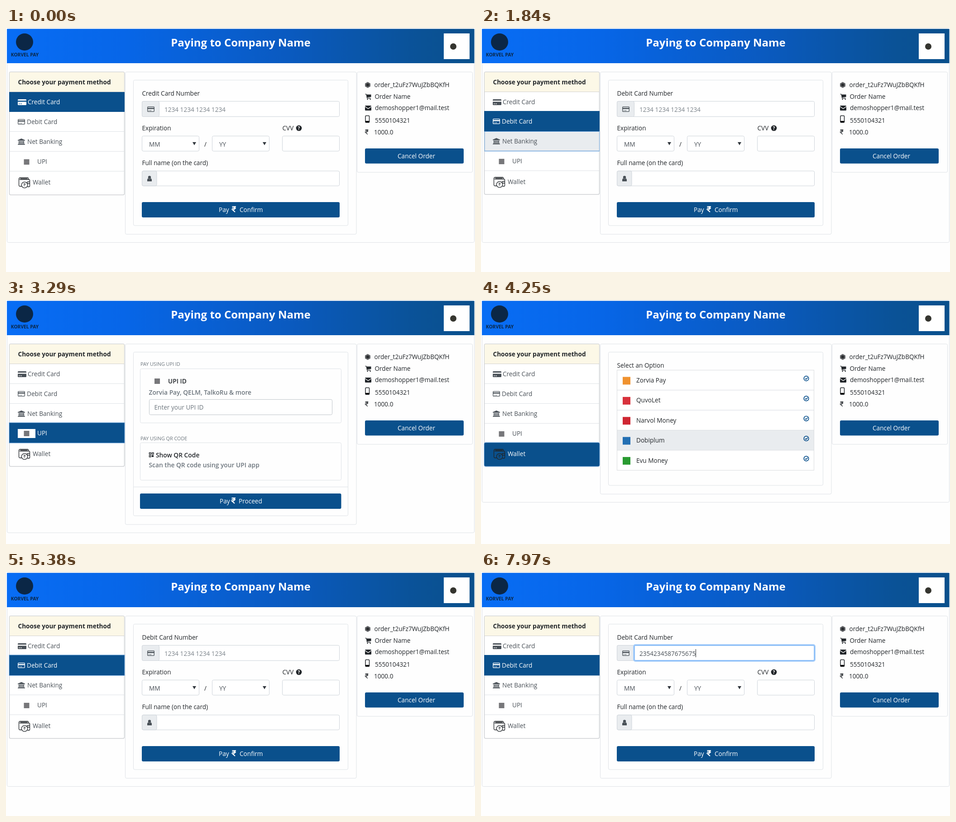
These frames come from a looping animation (1036x541 px, 8000 ms). An HTML page:

```html
<!DOCTYPE html>
<html lang="en">
<head>
<meta charset="utf-8">
<title>Payment page</title>
<style>
  html, body { margin: 0; width: 100%; height: 100%; overflow: hidden; background: #fefefe; }
  svg { display: block; width: 1036px; height: 541px; }
  text { font: 13.6px "Open Sans", "Noto Sans", sans-serif; fill: #212529; white-space: pre; }
  .title { font-size: 24px; font-weight: 700; }
  .bold { font-weight: 700; }
  .semi { font-size: 13.8px; font-weight: 600; }
  .small { font-size: 10.8px; }
  .brand { font-size: 10.3px; font-weight: 700; }
</style>
</head>
<body>
<svg id="stage" viewBox="0 0 1036 541">
  <defs>
    <linearGradient id="sky">
      <stop offset="0" stop-color="#086df5"/>
      <stop offset=".25" stop-color="#0766e8"/>
      <stop offset=".6" stop-color="#0a5ac0"/>
      <stop offset=".88" stop-color="#0a5297"/>
      <stop offset="1" stop-color="#0a508c"/>
    </linearGradient>
    <g id="credit">
      <path fill="currentColor" fill-rule="evenodd" d="M1.5 0h16a1.5 1.5 0 0 1 1.5 1.5V3H0V1.500A1.5 1.500 0 0 1 1.5 0ZM0 5.500H19V11.500A1.500 1.500 0 0 1 17.500 13H1.500A1.500 1.500 0 0 1 0 11.500ZM2 9.500V10.800H5V9.500ZM6 9.500V10.800H9V9.500Z"/>
    </g>
    <g id="card">
      <rect x=".7" y=".7" width="14.600" height="10.600" rx="1.300" fill="none" stroke="currentColor" stroke-width="1.300"/>
      <path fill="currentColor" d="M1 3H15V5.500H1ZM3 8.500H5V9.600H3ZM6 8.500H9V9.600H6Z"/>
    </g>
    <path id="bank" fill="currentColor" d="M8 0L16 3.500V4.700H0V3.500ZM2 5.500H4.200V10.800H2ZM5.300 5.500H7.400V10.800H5.300ZM8.600 5.500H10.700V10.800H8.600ZM11.800 5.500H14V10.800H11.800ZM1 11.200H15V12.400H1ZM0 12.800H16V14H0Z"/>
    <path id="rupee" fill="none" stroke="currentColor" d="M.5 1H9M.5 4.300H9M.5 1H3Q6.500 1 6.500 4.300T3 7.500H1L7 13"/>
    <g id="wallet" fill="none" stroke="currentColor" stroke-width="1.300">
      <path d="M7 20H3Q1 20 1 17V4Q1 1 4 1H20Q22 1 22 3V5M2 4.500Q3 5 5 5H23Q25 5 25 7V19Q25 21 23 21H20M25 10H21Q19 10 19 12T21 14H25M4 3H20"/>
      <circle cx="13.500" cy="17" r="6.700"/>
      <use href="#rupee" transform="translate(11 13.500) scale(.55)"/>
    </g>
    <g id="tick" fill="none" stroke="#0a508c" stroke-width="1.700">
      <circle r="5.300"/><path d="M-2.600 0L-.6 2L3 -1.800"/>
    </g>
    <path id="cart" fill="currentColor" d="M0 0H2.700L3.200 1.500H13V7L4.600 8L4.800 9H12V10.200H3.700L2 1.200H0ZM4 11H6.300V13H4ZM10 11H12.300V13H10Z"/>
  </defs>
  <g id="view"></g>
</svg>
<script>
const NAVY = '#0a508c', INK = '#212529', GREY = '#495057', LINE = '#dee2e6', EDGE = '#ced4da', SHADE = '#e9ecef';
const LOOP = 8000, NUMBER = '2354234587675675', TYPE_START = 6150, TYPE_STEP = 105;

// Pointer and page state: each entry overrides the earlier ones.
const timeline = [
  [0, { page: 0, focus: -1, hover: -1, row: -1, editing: false }],
  [700, { hover: 1 }],
  [1000, { page: 1, focus: 1 }],
  [1500, { hover: 2 }],
  [1800, { focus: 2 }],
  [1900, { page: 2 }],
  [2450, { hover: 3 }],
  [2750, { page: 3, focus: 3 }],
  [3400, { hover: 4 }],
  [3600, { page: 4, focus: 4, hover: -1 }],
  [3950, { row: 4 }],
  [4100, { row: 3 }],
  [4600, { row: -1 }],
  [4800, { hover: 1 }],
  [5050, { page: 1, focus: 1, hover: -1 }],
  [5950, { focus: -1, editing: true }]
];

const text = (x, y, str, fill = INK, cls = '', more = '') =>
  `<text x="${x}" y="${y}" class="${cls}" style="fill:${fill}" ${more}>${str}</text>`;
const centred = (x, y, str, fill, cls) => text(x, y, str, fill, cls, 'text-anchor="middle"');
const box = (x, y, right, bottom, stroke = LINE, fill = 'none', r = 3, w = 1) =>
  `<rect x="${x}" y="${y}" width="${right - x}" height="${bottom - y}" rx="${r}" fill="${fill}" stroke="${stroke}" stroke-width="${w}"/>`;
const icon = (id, x, y, color = GREY, more = '') =>
  `<use href="#${id}" transform="translate(${x} ${y})" color="${color}" ${more}/>`;
const hline = (x, right, y, color = LINE) => `<path d="M${x} ${y}H${right}" stroke="${color}"/>`;
const square = (x, y, size, fill) => box(x, y, x + size, y + size, 'none', fill, 0);
const button = (x, y, right, bottom) => box(x, y, right, bottom, 'none', NAVY);

function header() {
  return `<rect x="2" y="2" width="1032.500" height="76" fill="url(#sky)"/>
    <circle cx="41" cy="31" r="19" fill="#0b2746"/>` +
    centred(41.5, 63, 'KORVEL PAY', '#0b2746', 'brand') +
    centred(518.5, 41, 'Paying to Company Name', '#fff', 'title') +
    box(967, 12, 1024, 69, 'none', '#fff', 0) +
    '<circle cx="988" cy="41" r="7" fill="#35352f"/>';
}

const menu = [
  { label: 'Credit Card', x: 48, y: 169, top: 142, end: 186, mark: (y, c) => icon('credit', 26, y - 11, c) },
  { label: 'Debit Card', x: 46, y: 213, top: 186, end: 230.5, mark: (y, c) => icon('card', 26, y - 11, c) },
  { label: 'Net Banking', x: 47, y: 257, top: 230.5, end: 274, mark: (y, c) => icon('bank', 26, y - 12, c) },
  { label: 'UPI', x: 69, y: 301, top: 274, end: 318, mark: (y, c) =>
    (c === '#fff' ? box(26, y - 14, 65, y + 6, 'none', '#fff', 0) : '') + square(39.5, y - 10, 12, '#77777a') },
  { label: 'Wallet', x: 59, y: 347, top: 318, end: 370, mark: y => icon('wallet', 27.5, y - 16, INK) }
];

function sidebar({ page, hover, focus }) {
  const shift = i => page > 0 && i >= page ? 1 : 0;
  const bottom = 370 - shift(4);
  let out = box(7.5, 97.5, 261.5, bottom, '#cfd1d4', '#fff', 3, 1.5) +
    box(8, 98, 261, 141.5, 'none', '#fcf8e7', 2) + hline(8, 261, 141.5, '#d3d3cf') +
    text(26.5, 125, 'Choose your payment method', INK, 'bold');
  menu.forEach((item, i) => {
    const active = i === page, s = shift(i), y = item.y - s;
    const top = item.top - s - (active && i ? 1 : 0), end = item.end - s;
    const ring = i === focus ? '#6fa5dc' : 'none';
    if (active) out += box(7, top, 262, end, ring, NAVY, i === 4 ? 3 : 0);
    else {
      if (i === hover) out += box(8, top, 261.5, end, ring, SHADE, 0);
      if (i < 4) out += hline(8, 261, Math.floor(end) - .5, i === hover ? '#6fa5dc' : LINE);
    }
    out += item.mark(y, active ? '#fff' : GREY) + text(item.x, y, item.label, active ? '#fff' : GREY);
  });
  return out;
}

function orderCard() {
  const hex = '<path d="M799 119.500L805 123V129.500L799 133L793 129.500V123Z" fill="#65676a"/><circle cx="799" cy="126.300" r="3.300" fill="#292b2e"/>';
  const mail = '<rect x="793" y="172" width="14" height="11" rx="1.500" fill="#212529"/><path d="M793 174L800 179L807 174" fill="none" stroke="#fff" stroke-width="1.200"/>';
  const phone = '<rect x="794" y="194.500" width="8.500" height="15" rx="1.500" fill="none" stroke="#212529" stroke-width="1.500"/><path d="M794 206H802.500V209H794Z"/>';
  return box(775.5, 97.5, 1030.5, 320) + hex + icon('cart', 793.5, 146, INK) + mail + phone +
    icon('rupee', 793, 225, INK, 'stroke-width="1.700" transform-origin="0 0"').replace(')"', ') scale(.82)"') +
    text(813.5, 131, 'order_t2uFz7WuJZbBQKfH') + text(814.5, 157, 'Order Name') +
    text(815, 182, 'demoshopper1@mail.test') + text(815, 210, '5550104321') + text(813, 236, '1000.0') +
    button(793, 267, 1011, 300.5) + centred(906.5, 289, 'Cancel Order', '#fff');
}

function frame(bottom) {
  return box(2.5, 1.5, 1034.5, bottom) + box(263.5, 97.5, 774, bottom - 18.2) + box(281.5, 115.5, 755.5, bottom - 37.5);
}

function payButton(x, y, right, label, gap) {
  const payX = x + (gap ? 170 : 176);
  return button(x, y, right, y + 34) + text(payX, y + 22, 'Pay', '#fff') +
    icon('rupee', payX + (gap ? 29 : 26), y + 9, '#fff', 'stroke-width="2.200"') +
    text(payX + (gap ? 46 : 42), y + 22, label, '#fff');
}

function dropdown(x, right, label) {
  const a = right - 14.5;
  return box(x, 239.5, right, 273, EDGE, '#fff') + text(x + 15.5, 262.5, label, GREY) +
    `<path d="M${a} 253H${a + 8}L${a + 4} 260Z" fill="#343a40"/>`;
}

function cardForm(kind, editing, typed) {
  const value = NUMBER.slice(0, typed);
  return frame(475.5) + text(300.5, 150, kind + ' Card Number') +
    box(300.5, 162.5, 736.5, 196.5, EDGE, '#fff') + box(300.5, 162.5, 338.5, 196.5, EDGE, SHADE) + icon('card', 312, 174) +
    (editing ? box(338, 162, 737, 197, '#aacffa', '#fff', 3, 4) + box(338.5, 162.5, 736.5, 196.5, '#76b3f5') : '') +
    text(350, 185.5, value || '1234 1234 1234 1234', value ? GREY : '#7b838a', '', 'id="number"') +
    (editing ? '<path id="caret" d="M0 171V189" stroke="#212529"/>' : '') +
    text(300.5, 227, 'Expiration') + dropdown(300.5, 426.5, 'MM') + text(438, 262.5, '/') + dropdown(455.5, 581.5, 'YY') +
    text(610.5, 227, 'CVV') + '<circle cx="647" cy="222" r="6.300" fill="#212529"/>' + centred(647, 226, '?', '#fff', 'brand') +
    box(610.5, 239.5, 736.5, 273, EDGE, '#fff') +
    text(300.5, 304, 'Full name (on the card)') +
    box(300.5, 317, 736.5, 350, EDGE, '#fff') + box(300.5, 317, 333, 350, EDGE, SHADE) +
    `<circle cx="317" cy="331" r="3.200" fill="${GREY}"/><path d="M312 340V337Q312 333.500 314.500 333.500Q317 335.500 319.500 333.500Q322 333.500 322 337V340Z" fill="${GREY}"/>` +
    payButton(300, 386, 737, 'Confirm', true);
}

function bankPage() {
  return frame(475.5) + text(300.5, 150, 'Select an Option') + payButton(300, 386, 737, 'Confirm', true);
}

function upiPage() {
  const soft = '#6c757d';
  const finder = (x, y) => box(x, y, x + 3.5, y + 3.5, INK, 'none', 0, 1.4);
  return frame(516) + text(297, 146, 'PAY USING UPI ID', soft, 'small') + box(296.5, 152.5, 740.5, 272.5) +
    square(328, 174, 12, '#77777a') + text(358, 184.5, 'UPI ID', INK, 'semi') +
    text(315.5, 210, 'Zorvia Pay, QELM, TalkoRu &amp; more', soft, 'semi') +
    box(316.5, 220.5, 720.5, 254.5, '#bfc5ca', '#fff') + text(327.5, 243, 'Enter your UPI ID', soft) +
    text(297, 310.5, 'PAY USING QR CODE', soft, 'small') + box(296.5, 316.5, 740.5, 399.5) +
    finder(316.5, 338.5) + finder(322.5, 338.5) + finder(316.5, 344.5) + square(322, 344, 4, INK) +
    text(331, 348.5, 'Show QR Code', INK, 'semi') + text(315.5, 371, 'Scan the QR code using your UPI app', soft, 'semi') +
    hline(282, 755, 414.5) + payButton(296, 429, 740.5, 'Proceed', false);
}

function walletPage(hovered) {
  const wallets = [['Zorvia Pay', '#f0922f'], ['QuvoLet', '#d8323c'], ['Narvol Money', '#cf2732'], ['Dobiplum', '#236fb3'], ['Evu Money', '#299b31']];
  return frame(448.5) + text(300.5, 150, 'Select an Option') + wallets.map(([name, color], i) => {
    const top = 155.5 + i * 44.4;
    return box(300.5, top, 735.5, top + 44.4, LINE, i === hovered ? SHADE : '#fff', 0) +
      square(313, top + 15, 17, color) + text(343, top + 27.5, name) + icon('tick', 718.5, top + 18.5);
  }).join('') + box(300.5, 155.5, 735.5, 377.5, '#d9dcdf', 'none', 0);
}

function content({ page, row, editing, typed }) {
  if (page === 2) return bankPage();
  if (page === 3) return upiPage();
  if (page === 4) return walletPage(row);
  return cardForm(page ? 'Debit' : 'Credit', editing, typed);
}

function stateAt(t) {
  const state = Object.assign({}, ...timeline.filter(([at]) => at <= t).map(([, change]) => change));
  state.typed = Math.max(0, Math.min(NUMBER.length, Math.floor((t - TYPE_START) / TYPE_STEP) + 1));
  return state;
}

const view = document.getElementById('view');
let shown = '';
function draw(t) {
  const state = stateAt(t), key = JSON.stringify(state);
  if (key === shown) return;
  shown = key;
  view.innerHTML = content(state) + header() + sidebar(state) + orderCard();
  const caret = document.getElementById('caret');
  if (caret) {
    const width = state.typed ? document.getElementById('number').getComputedTextLength() : 0;
    caret.setAttribute('transform', `translate(${Math.round(350 + width) + .5} 0)`);
  }
}

const start = performance.now();
function tick(now) {
  draw(Math.max(0, now - start) % LOOP);
  requestAnimationFrame(tick);
}
draw(0);
requestAnimationFrame(tick);
</script>
</body>
</html>
```
